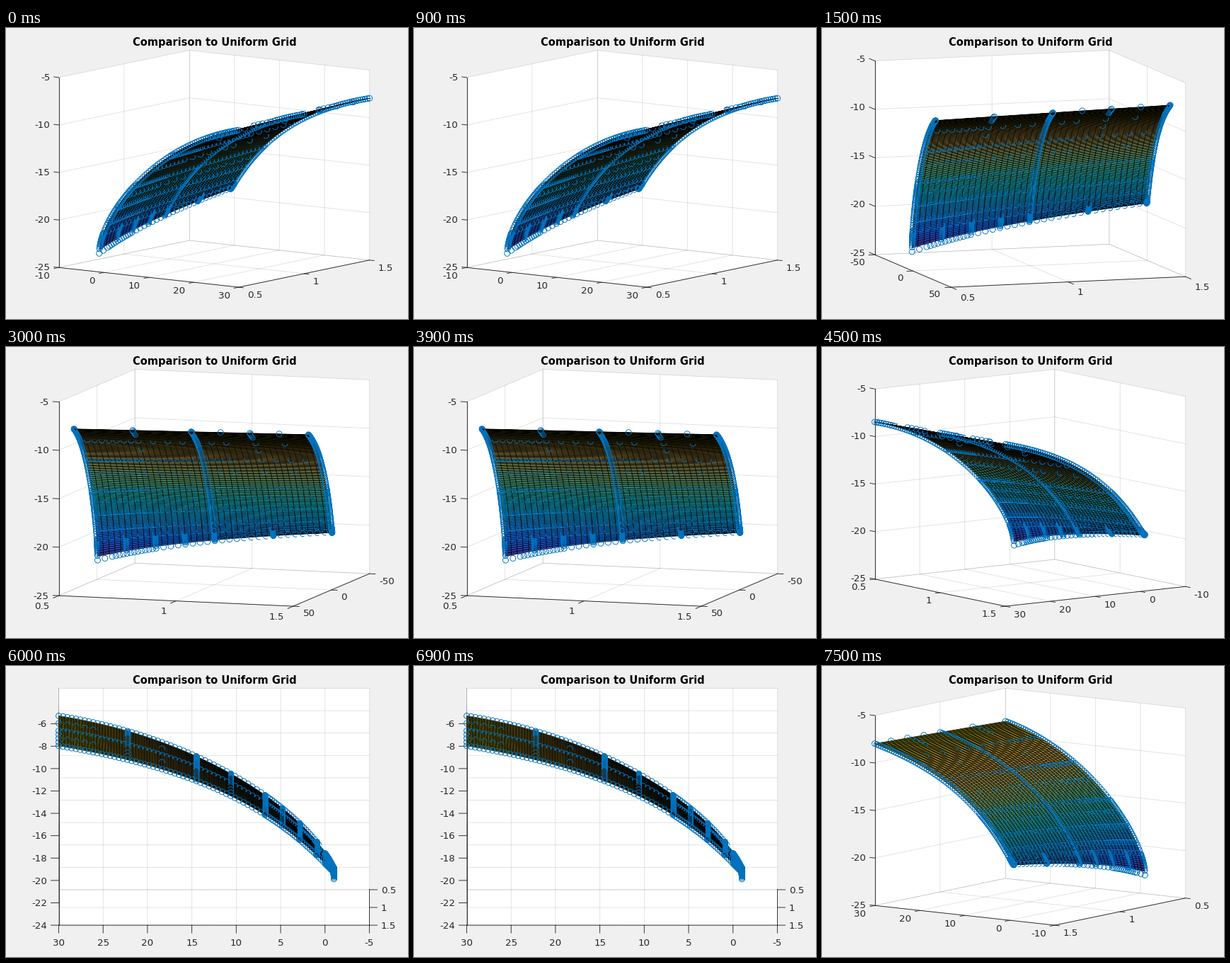
Recreate the animation shown at these times as a matplotlib script. Size 568x411 px, loop 8000 ms.

```python
import numpy as np
import matplotlib.pyplot as plt
from matplotlib.animation import FuncAnimation
from matplotlib.collections import PolyCollection
from matplotlib.colors import LinearSegmentedColormap

W, H, DPI = 568, 411, 64
PX = 72 / DPI                       # one pixel in points
LEFT, RIGHT, TOP, BOTTOM = 74, 513, 31, 365.6
ELEV = np.radians(10)
INK, BLUE = "#262626", "#0072bd"
STEP, HOLD, TOTAL = 500, 1500, 8000

# azimuth, (x low, high, step), (z low, high, step)
VIEWS = [
    (36, (-10, 30, 10), (-25, -5, 5)),
    (72, (-50, 50, 50), (-25, -5, 5)),
    (108, (-50, 50, 50), (-25, -5, 5)),
    (144, (-10, 30, 10), (-25, -5, 5)),
    (180.01, (-5, 30, 5), (-24, -6, 2)),
    (216, (-10, 30, 10), (-25, -5, 5)),
]

PARULA = LinearSegmentedColormap.from_list("blue_to_yellow", np.array([
    (53, 42, 135), (15, 92, 221), (18, 125, 216), (7, 156, 207),
    (21, 177, 180), (89, 189, 140), (165, 190, 107), (225, 185, 82),
    (252, 206, 46), (249, 251, 14)]) / 255)

# Height along the two side edges, as polynomials in t = sqrt((x + 1) / 31)
LOW = np.polyfit([0, .17, .31, .433, .5, .612, .707, .866, 1],
                 [-23.05, -20.95, -18.75, -16.8, -15.54, -13.64, -12.06, -9.85, -8.46], 4)
HIGH = np.polyfit([0, .354, .5, .612, .707, .866, 1],
                  [-19.05, -16.36, -14.15, -12.44, -11.1, -9.22, -7.97], 4)


def surface(t, v):
    """Point (x, y, z) for t in 0..1 along x and v in 0..1 along y."""
    k = 2 * (1 - t) + 0.1
    rise = np.log(1 + k * v) / np.log(1 + k)
    lo, hi = np.polyval(LOW, t), np.polyval(HIGH, t)
    return -1 + 31 * t ** 2, 0.5 + v, lo + (hi - lo) * rise


def steps(a, b, n):
    """Multiples of 1/n from a to b."""
    return np.arange(round(a * n), round(b * n) + 1) / n


def adaptive_points():
    """Refined sample points as pairs (share of x range, share of y range)."""
    pts = set()

    def add(xs, vs):
        pts.update((float(x), float(v)) for x in xs for v in vs)

    fine = np.concatenate([steps(0, 1 / 32, 512), steps(1 / 32, 1 / 4, 128), steps(1 / 4, 1, 64)])
    add(fine, (0, .5, 1))
    add(steps(0, 1 / 32, 512), (.125, .25, .375, .75))
    add(steps(29 / 32, 1, 32), (.25, .75))
    add((5 / 8, 7 / 8), (.25, .75))
    add((1,), (.625, .875))
    # rows: density in the first quarter, up to 0.625, and beyond
    for x, a, b, c in ((.75, 32, 16, 8), (.5, 64, 32, 16), (.375, 32, 16, 8),
                       (.25, 64, 32, 32), (.1875, 32, 16, 16), (.125, 64, 32, 32),
                       (.0625, 64, 32, 32), (.03125, 32, 32, 16), (0, 32, 32, 32)):
        add((x,), np.concatenate([steps(0, .25, a), steps(.25, .625, b), steps(.625, 1, c)]))
    add((0,), steps(.06, .25, 64))
    arr = np.array(sorted(pts))
    return np.sqrt(arr[:, 0]), arr[:, 1]


ROWS, COLS = 120, 40
T_EDGE = np.sqrt(np.linspace(0.006, 1, ROWS + 1) ** 1.3)
GRID_T, GRID_V = np.meshgrid(T_EDGE, np.linspace(0, 1, COLS + 1), indexing="ij")
DOT_T, DOT_V = adaptive_points()


class View:
    def __init__(self, az, xr, zr):
        a = np.radians(az)
        c, s, ce, se = np.cos(a), np.sin(a), np.cos(ELEV), np.sin(ELEV)
        span = abs(c) + abs(s)
        sx = (RIGHT - LEFT) / span
        sy = (BOTTOM - TOP) / (ce + se * span)
        self.m = np.array([[sx * c, sx * s, 0],
                           [sy * s * se, -sy * c * se, -sy * ce],
                           [s * ce, -c * ce, se]])
        self.lim = np.array([xr[:2], (.5, 1.5), zr[:2]], float)
        self.ticks = [np.arange(lo, hi + st / 2, st) for lo, hi, st in (xr, (.5, 1.5, .5), zr)]
        self.front = [int(s > 0), int(c < 0)]

    def project(self, x, y, z):
        """Screen x, screen y and nearness to the viewer."""
        p = [(q - lo) / (hi - lo) - .5 for q, (lo, hi) in zip((x, y, z), self.lim)]
        out = [sum(row[i] * p[i] for i in range(3)) for row in self.m]
        return np.array([out[0] + (LEFT + RIGHT) / 2, out[1] + (TOP + BOTTOM) / 2, out[2]])

    def at(self, t, v):
        return self.project(*surface(t, v))


def draw_walls(ax, view):
    (x0, x1), (y0, y1), (z0, z1) = view.lim
    xf, yf = view.lim[0][view.front[0]], view.lim[1][view.front[1]]
    xb, yb = x0 + x1 - xf, y0 + y1 - yf

    def path(*pts):
        return np.array([view.project(*p)[:2] for p in pts])

    planes = [path((x0, y0, z0), (x1, y0, z0), (x1, y1, z0), (x0, y1, z0)),
              path((xb, y0, z0), (xb, y1, z0), (xb, y1, z1), (xb, y0, z1)),
              path((x0, yb, z0), (x1, yb, z0), (x1, yb, z1), (x0, yb, z1))]
    ax.add_collection(PolyCollection(planes, facecolor="white", edgecolor="none", zorder=0))

    lines = [path((x, yf, z0), (x, yb, z0), (x, yb, z1)) for x in view.ticks[0]]
    lines += [path((xf, y, z0), (xb, y, z0), (xb, y, z1)) for y in view.ticks[1]]
    lines += [path((xf, yb, z), (xb, yb, z), (xb, yf, z)) for z in view.ticks[2]]
    for ln in lines:
        ax.plot(*ln.T, color=INK, alpha=.15, lw=PX * .8, zorder=1)


def draw_rulers(ax, view):
    (x0, x1), (y0, y1), (z0, z1) = view.lim
    xf, yf = view.lim[0][view.front[0]], view.lim[1][view.front[1]]
    xb, yb = x0 + x1 - xf, y0 + y1 - yf
    corner = view.project(xf, yf, z0)[:2]
    ends = view.project(xb, yf, z0)[:2], view.project(xf, yb, z0)[:2]
    # outward screen directions along x and along y
    out = [(corner - e) / np.hypot(*(corner - e)) for e in ends]
    left = 0 if ends[0][0] < ends[1][0] else 1
    zx, zy = ((xb, yf), (xf, yb))[left]
    height = abs(view.m[1, 2])
    size = .025 * max(height, *(np.hypot(*(corner - e)) for e in ends))

    def ruler(a, b, spots, values, d, upright=False):
        a, b = view.project(*a)[:2], view.project(*b)[:2]
        ax.plot(*zip(a, b), color=INK, lw=PX * .9, zorder=2)
        for p, val in zip(spots, values):
            p = view.project(*p)[:2]
            q = p + d * size
            ax.plot(*zip(p, q), color=INK, lw=PX * .9, zorder=2)
            side = 0 if abs(d[0]) < .05 else np.sign(d[0])
            drop = 0 if upright or abs(d[1]) < .01 else 9 + 4 * abs(d[1])
            ax.text(q[0] + 5.5 * side, q[1] + drop + 4.8, f"{val:g}",
                    ha={-1: "right", 0: "center", 1: "left"}[int(side)],
                    va="baseline", size=13.33 * PX, color=INK)

    xs, ys, zs = view.ticks
    ruler((x0, yf, z0), (x1, yf, z0), [(x, yf, z0) for x in xs], xs, out[1])
    ruler((xf, y0, z0), (xf, y1, z0), [(xf, y, z0) for y in ys], ys, out[0])
    ruler((zx, zy, z0), (zx, zy, z1), [(zx, zy, z) for z in zs], zs, -out[left], True)


def draw_surface(ax, view):
    p = view.at(GRID_T, GRID_V)
    quads = np.stack([p[:, :-1, :-1], p[:, 1:, :-1], p[:, 1:, 1:], p[:, :-1, 1:]], axis=-1)
    quads = quads.reshape(3, -1, 4)
    z = surface(GRID_T, GRID_V)[2]
    shade = PARULA(((z - z.min()) / np.ptp(z))[:-1, :-1].ravel())
    order = np.argsort(quads[2].mean(axis=1))
    ax.add_collection(PolyCollection(
        np.moveaxis(quads[:2], 0, -1)[order], facecolors=shade[order],
        edgecolors="black", linewidths=PX * .67, zorder=3))


def draw_dots(ax, view):
    """Circles facing the viewer, cut where the surface passes before them."""
    e = 1e-4
    p = view.at(DOT_T, DOT_V)
    pt = (view.at(DOT_T + e, DOT_V) - p) / e
    pv = (view.at(DOT_T, DOT_V + e) - p) / e
    det = pt[0] * pv[1] - pt[1] * pv[0]
    det = np.where(np.abs(det) < 1e-6, 1e-6, det)[:, None]
    ang = np.linspace(0, 2 * np.pi, 29)
    dx, dy = 4 * np.cos(ang), 4 * np.sin(ang)
    pt, pv = pt[..., None], pv[..., None]
    dt = (dx * pv[1] - dy * pv[0]) / det
    dv = (dy * pt[0] - dx * pt[1]) / det
    t, v = DOT_T[:, None] + dt, DOT_V[:, None] + dv
    outside = (t < T_EDGE[0]) | (t > 1) | (v < 0) | (v > 1)
    seen = outside | (pt[2] * dt + pv[2] * dv <= 0)
    gap = np.full((len(DOT_T), 1), np.nan)
    xs = np.hstack([np.where(seen, p[0][:, None] + dx, np.nan), gap])
    ys = np.hstack([np.where(seen, p[1][:, None] + dy, np.nan), gap])
    ax.plot(xs.ravel(), ys.ravel(), color=BLUE, lw=PX * .9, zorder=4)


plt.rcParams["font.family"] = "DejaVu Sans"
fig = plt.figure(figsize=(W / DPI, H / DPI), dpi=DPI, facecolor="#f0f0f0")
ax = fig.add_axes([0, 0, 1, 1])
views = [View(*v) for v in VIEWS]


def draw(i):
    view = views[i * STEP // HOLD]
    ax.clear()
    ax.set_axis_off()
    ax.set_xlim(-.5, W - .5)
    ax.set_ylim(H - .5, -.5)
    draw_walls(ax, view)
    draw_rulers(ax, view)
    draw_surface(ax, view)
    draw_dots(ax, view)
    ax.text((LEFT + RIGHT) / 2 + .5, 24, "Comparison to Uniform Grid", ha="center",
            va="baseline", size=14.67 * PX, weight="bold", color="black")
    return ax.get_children()


anim = FuncAnimation(fig, draw, frames=TOTAL // STEP, interval=STEP,
                     init_func=lambda: [], repeat=True, repeat_delay=0, blit=False)
plt.show()
```
